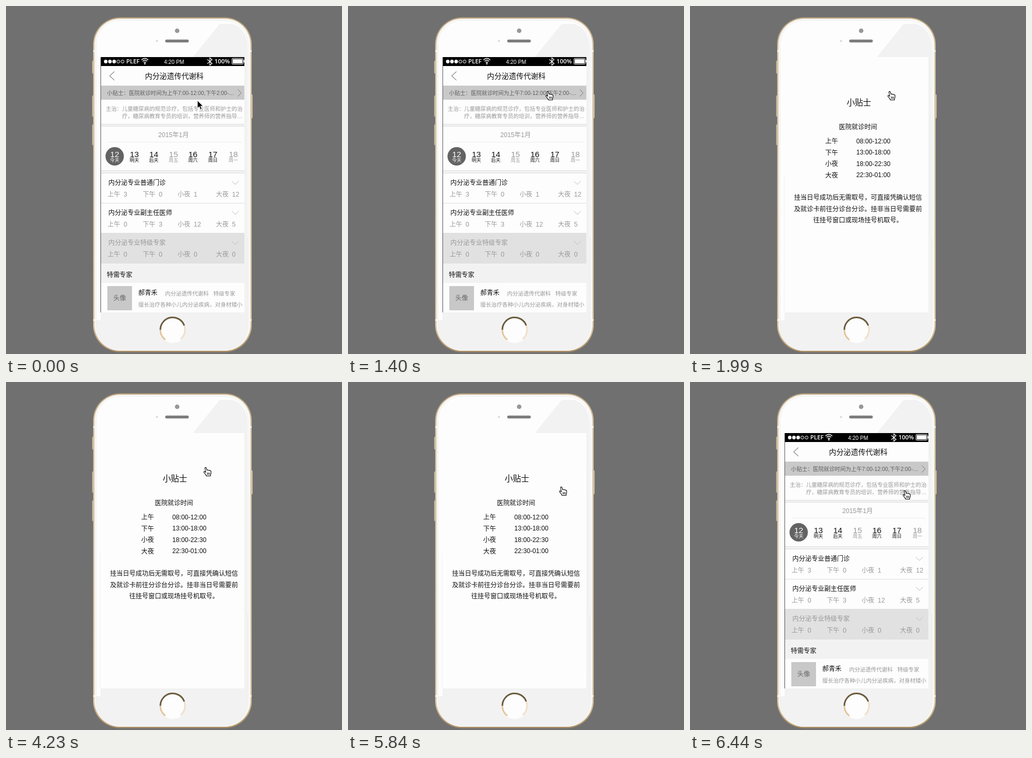
Write an HTML page that moves like this. It is 640 by 661 pixels and loops after 8000 ms.

```html
<!DOCTYPE html>
<html lang="zh-CN">
<head>
<meta charset="utf-8">
<title>门诊小贴士</title>
<style>
html, body { margin: 0; width: 100%; height: 100%; overflow: hidden; background: #707070; }
svg { display: block; width: 640px; height: 661px; }
text { font-family: "Liberation Sans", "Noto Sans CJK SC", "Noto Sans CJK", sans-serif; white-space: pre; }
.status { font-family: "Open Sans", sans-serif; font-size: 11.4px; font-weight: 600; fill: #fff; }
</style>
</head>
<body>
<svg viewBox="0 0 640 661" xmlns="http://www.w3.org/2000/svg">
  <defs>
    <linearGradient id="gold" x1="0" y1="0" x2="0" y2="1">
      <stop offset="0" stop-color="#b39c76"/>
      <stop offset=".1" stop-color="#d2c09f"/>
      <stop offset=".5" stop-color="#cdbfa5"/>
      <stop offset=".92" stop-color="#d6c29d"/>
      <stop offset="1" stop-color="#a98a5f"/>
    </linearGradient>
    <clipPath id="face"><rect x="172" y="27" width="289" height="628" rx="45"/></clipPath>
    <clipPath id="view"><rect x="180" y="97" width="274" height="485"/></clipPath>
  </defs>

  <rect width="640" height="661" fill="#707070"/>

  <g id="phone">
    <g fill="#d6c9b0" stroke="#a3957a" stroke-width=".6">
      <rect x="164.300" y="104" width="4" height="24" rx="1"/>
      <rect x="164.300" y="170" width="4" height="40" rx="1"/>
      <rect x="164.300" y="225" width="4" height="39" rx="1"/>
      <rect x="466" y="168" width="3.700" height="45" rx="1"/>
    </g>
    <rect x="166" y="21.500" width="302" height="636" rx="51" fill="url(#gold)"/>
    <rect x="168" y="23.500" width="298" height="631.500" rx="49" fill="#ece3d3"/>
    <path d="M166 85.500H170M464 85.500H468M166 596.500H170M464 596.500H468" stroke="#f6f1e8" stroke-width="3"/>
    <rect x="169.500" y="25" width="295" height="629" rx="47.500" fill="#fdfdfd"/>
    <rect x="171.500" y="27" width="290" height="627" rx="45.500" fill="#fdfdfd" stroke="#e9e8e6" stroke-width=".9"/>
    <g clip-path="url(#face)" fill="#f2f2f2">
      <path d="M407 34H430Q455 40 460 72V440H454V97H356Z"/>
      <path d="M454 440H461V660H172V597H180V582H454Z"/>
    </g>
    <path d="M179.500 325V582" stroke="#f1f1f1"/>
    <circle cx="326" cy="47" r="4.300" fill="#979797"/>
    <circle cx="287.500" cy="66.500" r="2.100" fill="#dadada"/>
    <rect x="303.500" y="64" width="44.500" height="5" rx="2" fill="#767676" stroke="#a6a6a6"/>
    <circle cx="317.500" cy="615" r="25" fill="#fdfdfd"/>
    <g fill="none" stroke-width="3">
      <path d="M294 615A23.500 23.500 0 0 1 339.600 607" stroke="#6a5a3d"/>
      <path d="M339.600 607A23.500 23.500 0 0 1 333 632.500" stroke="#efdfc8"/>
      <path d="M294 615A23.500 23.500 0 0 0 303.500 634" stroke="#e3c49d"/>
    </g>
  </g>

  <g id="list" clip-path="url(#view)"></g>
  <g id="tips" clip-path="url(#view)"></g>

  <path id="arrow" d="M1 1V15.800L4.400 12.600L6.700 18L9.300 16.900L7 11.700H11.600Z" fill="#000" stroke="#fff" stroke-width=".9"/>
  <g id="hand" stroke="#000" stroke-linecap="round" stroke-linejoin="round">
    <path d="M2.800 1.500C2.800 .1 5 0 5.500 1.300L7 5.700C7.500 4.700 9.200 4.700 9.600 6C10.300 5.200 11.700 5.400 12 6.600C13 6 14.400 6.700 14.500 8.100C14.700 10.400 14.900 11.700 13.500 14V16.500H5.700C5 14 3.200 12.500 1.500 10.500C0 8.800 1.300 7.300 2.800 8.300L4.500 9.700Z" fill="#fff" stroke-width="1.100"/>
    <path d="M7.500 10.500V14M9.500 10.500V14M11.500 10.500V14" stroke-width=".9"/>
  </g>
</svg>

<script>
const $ = id => document.getElementById(id);
const INK = '#111', MUTED = '#999', WHITE = '#fdfdfd', RULE = '#dedede';

// y is the middle of the glyphs; baselines sit on whole pixels
const text = (x, y, size, str, fill = INK, anchor = 'start') =>
  `<text x="${x}" y="${Math.floor(y + size * 0.37)}" font-size="${size}" fill="${fill}" text-anchor="${anchor}">${str}</text>`;
const mid = (x, y, size, str, fill) => text(x, y, size, str, fill, 'middle');
const rect = (x, y, w, h, fill) => `<rect x="${x}" y="${y}" width="${w}" height="${h}" fill="${fill}"/>`;
const band = (top, bottom, fill) => rect(180, top, 274, bottom - top, fill);
const line = (d, stroke, width = 1) =>
  `<path d="${d}" fill="none" stroke="${stroke}" stroke-width="${width}"/>`;

function statusBar() {
  let out = band(97, 114, '#000');
  for (let i = 0; i < 5; i++) {
    out += `<circle cx="${190 + i * 8}" cy="105.500" r="${i < 3 ? 3.4 : 2.9}" fill="${i < 3 ? '#fff' : 'none'}" stroke="#fff" stroke-width="${i < 3 ? 0 : 1}"/>`;
  }
  out += '<text class="status" x="229" y="109">PLEF</text>';
  out += line('M258 102.500Q264.500 96.500 271 102.500M260.200 105Q264.500 101 268.800 105M262.400 107.500Q264.500 105.500 266.600 107.500', '#fff', 1.4);
  out += '<circle cx="264.500" cy="109.700" r="1.400" fill="#fff"/>';
  out += text(301, 106.2, 10.3, '4:20 PM', '#fff');
  out += line('M383.500 101.500L392.500 109L388.300 112.500V98.500L392.500 102L383.500 109.500', '#fff', 1.2);
  out += '<text class="status" x="397" y="109">100%</text>';
  out += '<rect x="430.500" y="99.500" width="21.500" height="11" rx="1.500" fill="none" stroke="#fff"/>';
  return out + rect(432, 101, 18.5, 8, '#fff') + rect(452.5, 103, 1.5, 4, '#fff');
}

function calendar() {
  const days = [[207, '今天'], [244.5, '明天'], [281.5, '后天'], [319, '周五'], [356, '周六'], [394, '周日'], [433, '周一']];
  let out = text(290, 245, 12.2, '2015年1月', MUTED) + line('M195 258.500H449', '#ededed');
  out += '<circle cx="207" cy="285.500" r="17.500" fill="#636363"/>';
  days.forEach(([x, name], i) => {
    const fill = i === 0 ? '#fff' : i === 3 || i === 6 ? MUTED : INK;
    out += mid(x, 281.5, 15.4, 12 + i, fill) + mid(x, 292.7, 9, name, fill);
  });
  return out;
}

function clinic(top, name, counts, off) {
  const xs = [193.5, 260.5, 327, 400];
  let out = band(top, top + 57, off ? '#e1e1e1' : WHITE);
  out += text(195, top + 18, 12.15, name, off ? MUTED : INK);
  out += line(`M430 ${top + 14.5}L437 ${top + 21}L443.500 ${top + 14.5}`, '#bdbdbd');
  ['上午', '下午', '小夜', '大夜'].forEach((part, i) => {
    out += text(xs[i], top + 40.3, 12, part, MUTED) + text(xs[i] + 30.5, top + 40.3, 12.4, counts[i], MUTED);
  });
  return out + line(`M180 ${top + 56.5}H454`, RULE);
}

function listScreen() {
  return band(97, 582, '#f2f2f2') + statusBar()
    + band(114, 151, WHITE) + line('M206.500 124.500L197.500 132.700L206.500 141', '#444')
    + mid(320.5, 133, 13.95, '内分泌遗传代谢科')
    + line('M180 151.500H454', '#d5d5d5') + band(152, 178, '#c9c9c9')
    + text(192.5, 165.3, 10.4, '小贴士：医院就诊时间为上午7:00-12:00,下午2:00-…', '#5f5f5f')
    + line('M441.500 158.500L448 165.300L441.500 172', '#777')
    + band(178, 224, WHITE)
    + text(190, 195.2, 10.45, '主治：', MUTED)
    + text(221, 195.2, 10.45, '儿童糖尿病的规范诊疗，包括专业医师和护士的治', MUTED)
    + text(221, 209.3, 10.45, '疗，糖尿病教育专员的培训，营养师的营养指导…', MUTED)
    + line('M180 224.500H454M180 228.500H454', RULE)
    + band(229, 312, WHITE) + calendar()
    + line('M180 312.500H454M180 317.500H454', RULE)
    + clinic(318, '内分泌专业普通门诊', [3, 0, 1, 12])
    + clinic(375, '内分泌专业副主任医师', [0, 3, 12, 5])
    + clinic(432, '内分泌专业特级专家', [0, 0, 0, 0], true)
    + text(192, 511, 12.2, '特需专家')
    + band(526, 582, WHITE) + rect(193, 532, 47, 46, '#c8c8c8')
    + mid(216.5, 555, 12.3, '头像', '#666')
    + text(252, 545, 12.2, '郝青禾')
    + text(303, 546.2, 10.4, '内分泌遗传代谢科', MUTED)
    + text(395, 546.2, 10.4, '特级专家', MUTED)
    + text(252, 567.2, 10.45, '擅长治疗各种小儿内分泌疾病，对身材矮小', MUTED)
    + rect(180, 97, 1, 485, '#555');
}

function tipsScreen() {
  const hours = [['上午', '08:00-12:00'], ['下午', '13:00-18:00'], ['小夜', '18:00-22:30'], ['大夜', '22:30-01:00']];
  const note = ['挂当日号成功后无需取号，可直接凭确认短信', '及就诊卡前往分诊台分诊。挂非当日号需要前', '往挂号窗口或现场挂号机取号。'];
  return band(97, 582, WHITE)
    + mid(321.8, 184, 15.6, '小贴士') + mid(320, 230, 12.15, '医院就诊时间')
    + hours.map(([part, span], i) =>
        text(257.5, 257 + i * 21.6, 12.2, part) + text(316.7, 256.5 + i * 21.6, 12.2, span)).join('')
    + note.map((row, i) => mid(320, 364.3 + i * 21.4, 12.2, row)).join('');
}

$('list').innerHTML = listScreen();
$('tips').innerHTML = tipsScreen();

// start time, pointer, x, y, screen
const LOOP = 8000;
const steps = [
  [0, 'arrow', 363.7, 178.5, 'list'],
  [500, 'arrow', 371.5, 164, 'list'],
  [650, 'arrow', 375, 160, 'list'],
  [1250, 'hand', 375, 162, 'list'],
  [1400, 'hand', 376, 162, 'list'],
  [1990, 'hand', 376, 162, 'tips'],
  [5840, 'hand', 402, 199, 'tips'],
  [5990, 'hand', 405, 206, 'tips'],
  [6440, 'hand', 405, 206, 'list']
];
const show = (id, on) => $(id).setAttribute('visibility', on ? 'visible' : 'hidden');

function draw() {
  const t = performance.now() % LOOP;
  const [, pointer, x, y, screen] = steps.filter(s => s[0] <= t).pop();
  show('list', screen === 'list');
  show('tips', screen === 'tips');
  show('arrow', pointer === 'arrow');
  show('hand', pointer === 'hand');
  $(pointer).setAttribute('transform', `translate(${x} ${y})`);
  requestAnimationFrame(draw);
}
draw();
</script>
</body>
</html>
```
